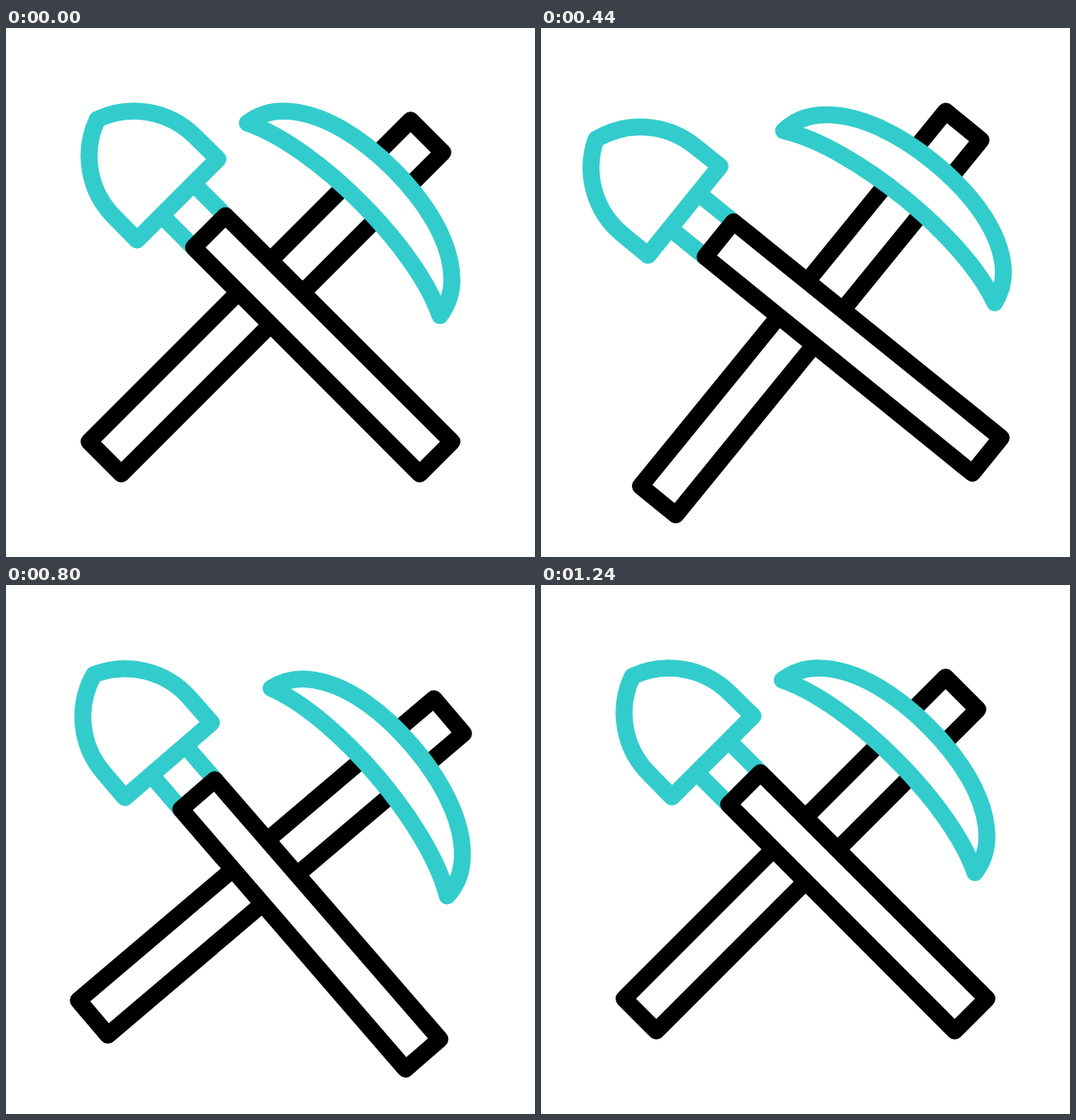
Animation, 640 px wide and 640 px high, one loop 1.72 s. Source, as an HTML page:

```html
<!DOCTYPE html>
<html lang="en">
<head>
<meta charset="utf-8">
<title>Shovel and pickaxe</title>
<style>
  html, body { margin: 0; height: 100%; overflow: hidden; background: #fff; }
  svg { display: block; width: 100%; height: 100%; }
  path { fill: #fff; stroke: #33cccc; stroke-width: 20.5; stroke-linejoin: round; }
  .handle { stroke: #000; }
</style>
</head>
<body>
<svg viewBox="0 0 640 640">
  <g id="pick">
    <path class="handle"/>
    <path d="M292 115C304 106 318 100.5 335 100.5C385 100.5 435 137.4 468.8 171.2C502.6 205 539.5 255 539.5 305C539.5 322 534 336 525 348C496.7 265 375 143.3 292 115Z"/>
  </g>
  <g id="shovel">
    <path d="M226.5 188L265.5 227L227 265.5L188 226.5"/>
    <path d="M110.5 110.5A104 104 0 0 1 228.5 131L256.5 158.5L158.5 256.5L131 228.5A104 104 0 0 1 110.5 110.5Z"/>
    <path class="handle"/>
  </g>
</svg>
<script>
const LOOP = 1720, STEP = 40;

const clamp = x => Math.min(1, Math.max(0, x));
const ease = (t, from, to) => {
  const u = clamp((t - from) / (to - from));
  return u * u * (3 - 2 * u);
};
// Rises from 0 to 1 at the peak, then falls back to 0.
const bell = (t, from, peak, to) => ease(t, from, peak) - ease(t, peak, to);

// Both tools tip back, swing past their rest angle and settle.
const swing = t => 6.7 * bell(t, 345, 675, 1020) - 9 * bell(t, 45, 345, 675);

const shapes = {
  pick: d => `M489.5 111.5L528.5 150.5L${139.5 - d} ${539.5 + d}L${100.5 - d} ${500.5 + d}Z`,
  shovel: d => `M265.5 227L${539.5 + d} ${500.5 + d}L${500.5 + d} ${539.5 + d}L227 265.5Z`
};

function pose(id, reach, x, y, angle, pivot) {
  const group = document.getElementById(id);
  group.querySelector('.handle').setAttribute('d', shapes[id](reach * Math.SQRT1_2));
  group.setAttribute('transform', `translate(${x} ${y}) rotate(${angle} ${pivot} )`);
}

function draw(t) {
  const pull = bell(t, 45, 510, 1010);
  pose('pick', 37 * pull, 26.3 * pull, 11.5 * bell(t, 45, 690, 1110), swing(t), '297 343');

  const push = bell(t, 150, 610, 1110);
  const drop = 14.9 * bell(t, 310, 900, 1230) - 3.1 * bell(t, 150, 310, 900);
  pose('shovel', 42 * push, -31 * push, drop, swing(t - 210), '338 338');
}

const start = performance.now();
function tick() {
  const t = (performance.now() - start) % LOOP;
  draw(Math.floor(t / STEP) * STEP);
  requestAnimationFrame(tick);
}
tick();
</script>
</body>
</html>
```
